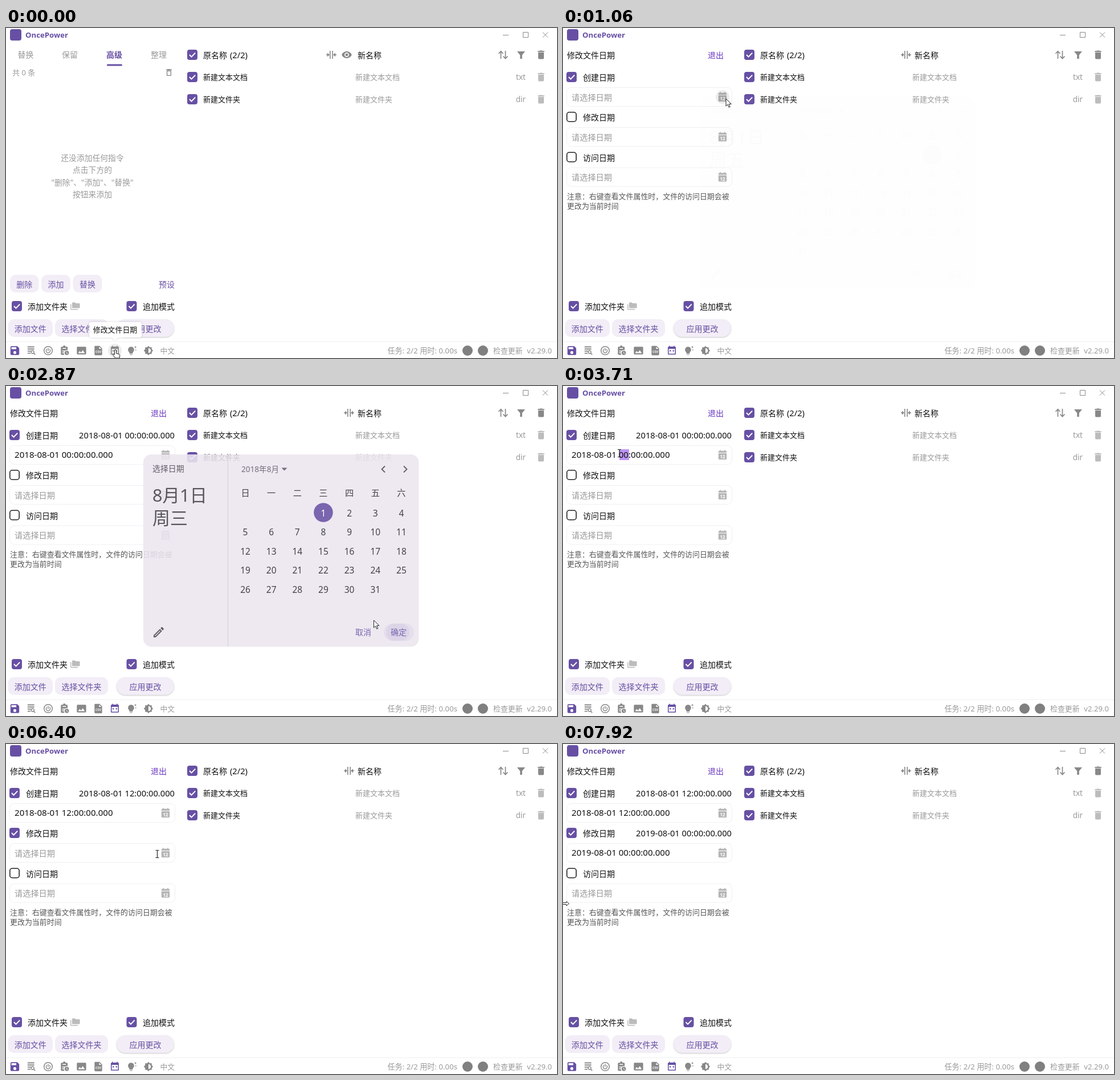
These frames come from a looping animation (967x579 px, 7990 ms). An HTML page:

```html
<!DOCTYPE html>
<html lang="zh-CN">
<head>
<meta charset="utf-8">
<title>OncePower</title>
<style>
html, body { margin: 0; width: 100%; height: 100%; overflow: hidden; background: #fff; }
svg { display: block; width: 967px; height: 579px; font-family: "Noto Sans", "Noto Sans CJK SC", sans-serif; }
text { white-space: pre; }
.lift { filter: drop-shadow(0 1px 1px rgba(0, 0, 0, .22)); }
.tip { filter: drop-shadow(0 0 2px rgba(0, 0, 0, .15)); }
</style>
</head>
<body>
<svg id="stage" viewBox="0 0 967 579"></svg>
<script>
const LOOP = 7990, PURPLE = '#6750a4', GREY = '#9a9a9a', ICON = '#888', PALE = '#bcbcbc', INK = '#111';
const stage = document.getElementById('stage');

// Two visits to the date picker; `first` is the weekday column of August 1st.
const visits = [
  { open: 1060, head: 1560, pick: 1950, ok: 2690, close: 2800, year: 2018, first: 3 },
  { open: 6450, head: 6840, pick: 7090, ok: 7380, close: 7450, year: 2019, first: 4 }
];
const WEEK = '日一二三四五六';

const D = {
  trash: 'M6 19c0 1.1.9 2 2 2h8c1.1 0 2-.9 2-2V7H6v12zM19 4h-3.5l-1-1h-5l-1 1H5v2h14V4z',
  bin: 'M6 19c0 1.1.9 2 2 2h8c1.1 0 2-.9 2-2V7H6v12zM8 9h8v10H8V9zm7.5-5l-1-1h-5l-1 1H5v2h14V4h-3.5z',
  eye: 'M12 4.5C7 4.5 2.73 7.61 1 12c1.73 4.39 6 7.5 11 7.5s9.27-3.11 11-7.5c-1.73-4.39-6-7.5-11-7.5zM12 17c-2.76 0-5-2.24-5-5s2.24-5 5-5 5 2.24 5 5-2.24 5-5 5zm0-8c-1.66 0-3 1.34-3 3s1.34 3 3 3 3-1.34 3-3-1.34-3-3-3z',
  pencil: 'M14.06 9.02l.92.92L5.92 19H5v-.92l9.06-9.06M17.66 3c-.25 0-.51.1-.7.29l-1.83 1.83 3.75 3.75 1.83-1.83c.39-.39.39-1.02 0-1.41l-2.34-2.34c-.2-.2-.45-.29-.71-.29zm-3.6 3.19L3 17.25V21h3.75L17.81 9.94l-3.75-3.75z',
  save: 'M17 3H5a2 2 0 0 0-2 2v14a2 2 0 0 0 2 2h14a2 2 0 0 0 2-2V7l-4-4zm-5 16a3 3 0 1 1 0-6 3 3 0 0 1 0 6zm3-10H5V5h10v4z',
  image: 'M23 19V5c0-1.1-.9-2-2-2H3c-1.1 0-2 .9-2 2v14c0 1.1.9 2 2 2h18c1.1 0 2-.9 2-2zM7.5 13l3.5 3.5L15 11l5 7H4l3.5-5z',
  day: 'M19 3h-1V1h-2v2H8V1H6v2H5a2 2 0 0 0-2 2v14a2 2 0 0 0 2 2h14a2 2 0 0 0 2-2V5a2 2 0 0 0-2-2zm0 16H5V8h14v11zM7 11h3v3H7zm7 0h3v3h-3z',
  date: 'M19 3h-1V1h-2v2H8V1H6v2H5a2 2 0 0 0-2 2v2h18V5a2 2 0 0 0-2-2zM3 8.2V20a2 2 0 0 0 2 2h14a2 2 0 0 0 2-2V8.2z',
  bulb: 'M7 20.5h6V22H7zM10 3a7 7 0 0 0-4 12.7V19h8v-3.3A7 7 0 0 0 10 3zM20 1l.9 2.1L23 4l-2.1.9L20 7l-.9-2.1L17 4l2.1-.9zM21 8.5l.6 1.4 1.4.6-1.4.6-.6 1.4-.6-1.4-1.4-.6 1.4-.6z',
  theme: 'M20 15.31L23.31 12 20 8.69V4h-4.69L12 .69 8.69 4H4v4.69L.69 12 4 15.31V20h4.69L12 23.31 15.31 20H20v-4.69zM12 18V6c3.31 0 6 2.69 6 6s-2.69 6-6 6z',
  file: 'M6 1h9l6 6v14a2 2 0 0 1-2 2H5a2 2 0 0 1-2-2V3a2 2 0 0 1 2-2zm8 1.8V8h5.2z',
  clip: 'M19 11V5a2 2 0 0 0-2-2h-3a3 3 0 0 0-6 0H5a2 2 0 0 0-2 2v15a2 2 0 0 0 2 2h6.5A7 7 0 0 1 10 18H6v-2h4.2l1-2H6v-2h7a7 7 0 0 1 6-1zM7 6h8v2H7zM17 12.5a5 5 0 1 0 0 10 5 5 0 0 0 0-10zm.6 2.5v2.6l2 1.6-.8 1-2.4-2V15z',
  find: 'M3 2h16v2.5H3zM3 7h16v2.5H3zM3 12h8v2.5H3zM3 17h7v2.5H3zM15 11a4.5 4.5 0 1 0 2.2 8.4l3.3 3.1 1.5-1.5-3.2-3.2A4.5 4.5 0 0 0 15 11zm0 2a2.5 2.5 0 1 1 0 5 2.5 2.5 0 0 1 0-5z',
  folders: 'M4 7H1v12a2 2 0 0 0 2 2h16v-2H3V7zM22 5h-8l-2-2H7a2 2 0 0 0-2 2v10a2 2 0 0 0 2 2h15a2 2 0 0 0 2-2V7a2 2 0 0 0-2-2z'
};

const text = (x, cy, s, size = 14, fill = INK, anchor = 'start', extra = '') =>
  `<text x="${x}" y="${cy + size * .36}" font-size="${size}" fill="${fill}" text-anchor="${anchor}" ${extra}>${s}</text>`;
const mid = (x, cy, s, size, fill, extra) => text(x, cy, s, size, fill, 'middle', extra);
const rect = (x, y, w, h, r, fill, extra = '') =>
  `<rect x="${x}" y="${y}" width="${w}" height="${h}" rx="${r}" fill="${fill}" ${extra}/>`;
const disc = (x, y, r, fill, extra = '') => `<circle cx="${x}" cy="${y}" r="${r}" fill="${fill}" ${extra}/>`;
const line = (d, color, w = 1) => `<path d="${d}" fill="none" stroke="${color}" stroke-width="${w}"/>`;
const icon = (name, x, y, scale, fill) =>
  `<path transform="translate(${x} ${y}) scale(${scale}) translate(-12 -12)" d="${D[name]}" fill="${fill}" fill-rule="evenodd"/>`;
// Group shown during the given "from-to" spans only.
const during = (spans, body) => `<g data-on="${spans}">${body}</g>`;
const after = (t, body) => during(`${t}-${LOOP}`, body);

const checked = (x, y) => rect(x - 9, y - 9, 18, 18, 4, PURPLE) +
  line(`M${x - 5} ${y}l3.5 3.6 6.7-7`, '#fff', 2);
const unchecked = (x, y) => rect(x - 8.2, y - 8.2, 16.4, 16.4, 4, '#fff', 'stroke="#222" stroke-width="1.6"');
const button = (x, y, w, label, r = 10, extra = '') =>
  rect(x, y, w, 31, r, '#f2edf6', extra) + mid(x + w / 2, y + 16.5, label, 14, PURPLE);
const field = (cy) => rect(6.5, cy - 16.5, 290, 33, 8, '#fff', 'stroke="#f0eef2"') +
  icon('date', 280, cy, .8, '#b5b5b5') + mid(280, cy + 3.2, '12', 8, '#fff', 'font-weight="700"');
const hint = (cy) => text(15, cy + .5, '请选择日期', 14.2, GREY);
const stamp = (cy, s) => text(296, cy, s, 14.7, INK, 'end');
const value = (cy, s) => text(15, cy, s, 15.1);

function windowBar() {
  return rect(7, 2, 20, 20, 4, PURPLE) + text(34, 12, 'OncePower', 13.2, PURPLE, 'start', 'font-weight="700"') +
    line('M872 12.5h10M907.5 7.5h9v9h-9zM942 7.5l9 9M951 7.5l-9 9', '#8a8a8a');
}

const align = (x) => line(`M${x - 2.2} 40v14M${x + 2.2} 40v14M${x - 9} 47h4M${x + 9} 47h-4`, ICON, 1.6) +
  `<path d="M${x - 7} 43.5l4 3.5-4 3.5zM${x + 7} 43.5l-4 3.5 4 3.5z" fill="${ICON}"/>`;

function fileList() {
  const row = (y, name, ext) => checked(327, y) + text(346, y, name, 13) + text(613, y, name, 13, GREY) +
    text(912, y + .5, ext, 13.5, GREY, 'end') + icon('trash', 939, y, .83, PALE);
  return checked(327, 47) + text(346, 48, '原名称') + text(424, 48, '(2/2)', 14.7, INK, 'end') + text(617, 48, '新名称') +
    during('0-210', align(571) + icon('eye', 598, 47, .8, ICON)) + after(210, align(602)) +
    line('M868.5 54v-13M864.5 45l4-4.2 4 4.2M876.5 40v13M872.5 49.5l4 4.2 4-4.2', ICON, 1.7) +
    `<path d="M897 41h14l-5.2 6.5v6.5h-3.6v-6.5z" fill="${ICON}"/>` +
    icon('trash', 939, 47, .83, ICON) +
    row(86, '新建文本文档', 'txt') + row(125, '新建文件夹', 'dir');
}

function commandPanel() {
  const note = ['还没添加任何指令', '点击下方的', '"删除"、"添加"、"替换"', '按钮来添加'];
  return mid(34.5, 46.5, '替换', 14, GREY) + mid(112, 46.5, '保留', 14, GREY) + mid(268, 46.5, '整理', 14, GREY) +
    mid(190, 46.5, '高级', 14, PURPLE, 'font-weight="700"') + rect(177, 63.5, 27, 3, 1.5, PURPLE) +
    text(11, 78, '共 0 条', 13, GREY) + icon('bin', 286, 78, .68, ICON) +
    note.map((s, i) => mid(151.5, 228 + i * 21.5, s, 13.8, GREY)).join('') +
    button(7, 433, 50.5, '删除') + button(62, 433, 51, '添加') + button(117.5, 433, 51, '替换') +
    text(268, 450, '预设', 14, PURPLE);
}

function datePanel() {
  const [a, b] = visits;
  return text(7, 48, '修改文件日期') + text(254, 48, '退出', 14, '#6a38c2') +
    checked(15, 86) + text(35, 87, '创建日期') + field(121) +
    during('800-1100', disc(280, 121, 12, '#000', 'opacity=".07"')) +
    during(`0-${a.close}`, hint(121)) +
    during(`${a.close}-4370`, stamp(86.5, '2018-08-01 00:00:00.000')) + after(4370, stamp(86.5, '2018-08-01 12:00:00.000')) +
    during('3450-4000', '<rect id="drag" y="111" height="19" fill="#bd95f3"/>') +
    during('4370-6270', rect(15, 111, 173, 19, 0, '#bd95f3')) +
    during(`${a.close}-4000`, value(121, '2018-08-01 00:00:00.000')) + after(4000, value(121, '2018-08-01 12:00:00.000')) +
    during('4000-4370', rect(116, 112, 1.5, 17, 0, PURPLE)) +
    during('5580-5860', disc(15, 156, 19, PURPLE, 'opacity=".08"')) +
    during('0-5700', unchecked(15, 156)) + after(5700, checked(15, 156)) + text(35, 157, '修改日期') + field(191) +
    during('6120-6340', disc(280, 191, 12, '#000', 'opacity=".07"')) +
    during(`0-${b.close}`, hint(191)) +
    after(b.close, stamp(157, '2019-08-01 00:00:00.000') + value(191, '2019-08-01 00:00:00.000')) +
    unchecked(15, 226.5) + text(35, 227.5, '访问日期') + field(261.5) + hint(261.5) +
    text(7, 295, '注意：右键查看文件属性时，文件的访问日期会被', 12.95, '#555') + text(7, 312.5, '更改为当前时间', 12.95, '#555');
}

function footer() {
  const y = 566;
  return checked(19, 488) + text(38, 489, '添加文件夹') + icon('folders', 121, 488, .72, PALE) +
    checked(220.5, 488) + text(240, 489, '追加模式') +
    button(3.5, 511, 78.5, '添加文件') + button(86, 511, 93, '选择文件夹') + button(194, 511, 101, '应用更改', 15.5, 'class="lift"') +
    line('M0 550.5h967', '#f0f0f0') + during('0-210', disc(191, y, 12, '#ececec')) +
    icon('save', 15.5, y, .85, PURPLE) + icon('find', 44.5, y, .74, ICON) +
    line(`M74 ${y - 4.5}v5M71.8 ${y - 2.5}a3.6 3.6 0 1 0 4.4 0`, ICON, 1.4) +
    disc(74, y, 7.3, 'none', `stroke="${ICON}" stroke-width="1.5"`) +
    icon('clip', 103, y, .74, ICON) + icon('image', 132.5, y, .74, ICON) +
    icon('file', 162, y, .74, ICON) + mid(162, y + 2.5, 'CSV', 5.5, '#fff', 'font-weight="700"') +
    during('0-210', icon('day', 191, y, .78, ICON)) + after(210, icon('day', 191, y, .78, PURPLE)) +
    icon('bulb', 221, y, .76, ICON) + icon('theme', 250, y, .72, ICON) +
    text(270.5, y, '中文', 12.8, GREY) + text(792, y, '任务: 2/2 用时: 0.00s', 13.2, GREY, 'end') +
    disc(810, y, 9, '#808080') + disc(837, y, 9, '#808080') +
    text(855, y, '检查更新', 12.9, GREY) + text(958, y, 'v2.29.0', 13.1, GREY, 'end') +
    during('0-200', '<path class="tip" d="M150 516h84q4 0 4 4v19q0 4-4 4h-38l-5 5-5-5h-36q-4 0-4-4v-19q0-4 4-4z" fill="#fff"/>' +
      mid(191.5, 529.5, '修改文件日期', 12.9));
}

function monthView(year, first) {
  const col = (i) => 420 + i * 45.65;
  let s = [...WEEK].map((c, i) => mid(col(i), 188, c, 15.2, '#2b2830')).join('') + disc(col(first), 222, 16.8, PURPLE);
  for (let d = 1; d <= 31; d++) {
    const n = d + first - 1;
    s += mid(col(n % 7), 223 + Math.floor(n / 7) * 33.6, d, 15.5, d === 1 ? '#fff' : '#2b2830');
  }
  return text(257, 232, '周' + WEEK[first], 31, '#423e47') + text(413, 146, year + '年8月', 13.6, '#5f5a66') +
    line('M665 140.5l-5.5 5.5 5.5 5.5M698 140.5l5.5 5.5-5.5 5.5', '#49454f', 1.8) + s;
}

function yearView() {
  let s = line('M390 178.5h334M390 399h334', '#cac4d0');
  for (let i = 0; i < 12; i++) {
    const x = 453 + (i % 3) * 104, y = 213 + Math.floor(i / 3) * 50.6, on = i === 7;
    if (on) s += rect(522, 296.5, 69, 33.5, 16.75, PURPLE);
    s += mid(x, y + .5, 2018 + i + '年', 15.7, on ? '#fff' : '#49454f');
  }
  return text(257, 232, '周五', 31, '#423e47') + text(413, 146, '2025年8月', 13.6, '#5f5a66') + s;
}

function picker() {
  const span = (f) => visits.map(f).join();
  return '<g id="picker">' + rect(241, 120, 483.5, 337.5, 14, '#ece6f0') + line('M389.5 120v337', '#cac4d0') +
    text(257, 145, '选择日期', 13.9, '#49454f') + text(257, 192, '8月1日', 30.5, '#423e47') + icon('pencil', 268, 432, 1, '#49454f') +
    during(span(v => `${v.head - 120}-${v.head + 190}`), rect(404, 121, 317, 50, 0, '#000', 'opacity=".03"')) +
    '<clipPath id="bar"><rect x="404" y="120" width="317" height="51"/></clipPath>' +
    '<g clip-path="url(#bar)"><circle id="ripple" cy="146" fill="#000"/></g>' +
    during(span(v => `${v.open}-${v.head}`), monthView(2025, 5)) +
    during(span(v => `${v.head}-${v.pick}`), yearView()) +
    visits.map(v => during(`${v.pick}-${v.close + 250}`, monthView(v.year, v.first))).join('') +
    '<path id="caret" d="M-5-2h10l-5 5z" fill="#5f5a66"/>' +
    during(span(v => `${v.ok - 170}-${v.close + 200}`), rect(663, 416.5, 53, 31, 15.5, PURPLE, 'opacity=".08"')) +
    during(span(v => `${v.ok}-${v.close + 200}`), rect(667, 417, 41, 30, 15, PURPLE, 'opacity=".08"')) +
    text(613, 432, '取消', 14, PURPLE) + text(675, 432, '确定', 14, PURPLE) + '</g>';
}

const shapes = {
  arrow: '<path d="M0 0v13l3-2.8 2.2 5 2-.9-2.1-4.9h4.2z" fill="#fff" stroke="#222"/>',
  hand: '<path d="M-1.5 1a1.5 1.5 0 0 1 3 0v5l4.8 1.2q1.8.6 1.5 2.6l-.8 4.2h-7.2l-4.2-5.5q-.3-1.8 1.5-1.3l1.4 1z" fill="#fff" stroke="#222"/>',
  beam: '<path d="M-3-6.5h2.2q.8.3.8 1V5.5q0 .8-.8 1H-3M3-6.5H.8q-.8.3-.8 1M3 6.5H.8q-.8-.2-.8-1" fill="none" stroke="#222" stroke-width="1.2"/>',
  resize: '<path d="M-2-1.5h8v-2.5l4.5 4-4.5 4v-2.5h-8z" fill="#fff" stroke="#222"/>'
};
const path = [
  [0, 192, 565], [230, 192, 565], [900, 289, 126], [1020, 286, 124], [1120, 286, 124], [1450, 500, 152], [1560, 500, 154],
  [1660, 482.5, 184], [1860, 455, 212], [1980, 455, 212], [2500, 690, 410], [2600, 690, 426], [2720, 690, 426], [2870, 645.5, 411],
  [3340, 128, 118], [3420, 128, 118], [3710, 99, 118], [4620, 99, 118], [4950, 136, 187.5], [5080, 136, 187.5],
  [5150, 134, 187], [5400, 134, 187], [5640, 16, 158], [5780, 16, 158], [6150, 283, 195], [6270, 283, 195], [6400, 265.5, 193],
  [6500, 275, 190], [6780, 500, 152], [6860, 500, 152], [7040, 556, 213], [7110, 556, 213], [7340, 690, 426], [7410, 690, 426],
  [7860, 2, 286], [7915, 2, 286], [7920, 0, 280], [LOOP, 0, 280]
];
const kinds = [
  [0, 'hand'], [260, 'arrow'], [1410, 'hand'], [1600, 'arrow'], [1800, 'hand'], [2040, 'arrow'], [2520, 'hand'], [2770, 'arrow'],
  [3290, 'beam'], [5470, 'arrow'], [5600, 'hand'], [5820, 'arrow'], [5860, 'beam'], [6120, 'arrow'], [6320, 'beam'], [6440, 'arrow'],
  [6730, 'hand'], [6890, 'arrow'], [6990, 'hand'], [7150, 'arrow'], [7300, 'hand'], [7440, 'arrow'], [7920, 'resize']
];

stage.innerHTML = windowBar() + fileList() + during('0-210', commandPanel()) + after(210, datePanel()) + footer() + picker() +
  `<g id="cursor">${Object.keys(shapes).map(k => `<g data-kind="${k}">${shapes[k]}</g>`).join('')}</g>`;

const $ = (id) => document.getElementById(id);
const el = { picker: $('picker'), ripple: $('ripple'), caret: $('caret'), drag: $('drag'), cursor: $('cursor') };
const timed = [...stage.querySelectorAll('[data-on]')].map(node =>
  ({ node, spans: node.dataset.on.split(',').map(s => s.split('-').map(Number)) }));
const cursors = [...stage.querySelectorAll('[data-kind]')];

const part = (t, from, to) => Math.min(1, Math.max(0, (t - from) / (to - from)));
const smooth = (p) => p * p * (3 - 2 * p);
const easeOut = (p) => 1 - (1 - p) * (1 - p);
const show = (node, on) => { node.style.display = on ? '' : 'none'; };

function drawPicker(t) {
  const v = visits.find(v => t >= v.open && t < v.close + 200);
  show(el.picker, v);
  if (!v) return;
  el.picker.style.opacity = easeOut(part(t, v.open, v.open + 150)) * easeOut(1 - part(t, v.close, v.close + 200));
  const turn = part(t, v.head, v.head + 200) - part(t, v.pick, v.pick + 200);
  el.caret.setAttribute('transform', `translate(488.5 145.5) rotate(${turn * 180})`);
  const p = part(t, v.head - 20, v.head + 140);
  el.ripple.setAttribute('cx', 500 + 62 * p);
  el.ripple.setAttribute('r', 10 + 120 * p);
  el.ripple.setAttribute('opacity', p ? .05 * (1 - part(t, v.head + 130, v.head + 260)) : 0);
}

function drawCursor(t) {
  const i = Math.max(1, path.findIndex(k => k[0] > t));
  const [t0, x0, y0] = path[i - 1], [t1, x1, y1] = path[i];
  const p = smooth(part(t, t0, t1));
  el.cursor.setAttribute('transform', `translate(${x0 + (x1 - x0) * p} ${y0 + (y1 - y0) * p})`);
  const kind = kinds.filter(k => k[0] <= t).pop()[1];
  cursors.forEach(c => show(c, c.dataset.kind === kind));
}

function draw(t) {
  timed.forEach(({ node, spans }) => show(node, spans.some(([a, b]) => t >= a && t < b)));
  const w = 17 * smooth(part(t, 3520, 3710));
  el.drag.setAttribute('x', 116 - w);
  el.drag.setAttribute('width', w);
  drawPicker(t);
  drawCursor(t);
}

const start = performance.now();
function tick() {
  draw((performance.now() - start) % LOOP);
  requestAnimationFrame(tick);
}
tick();
</script>
</body>
</html>
```
